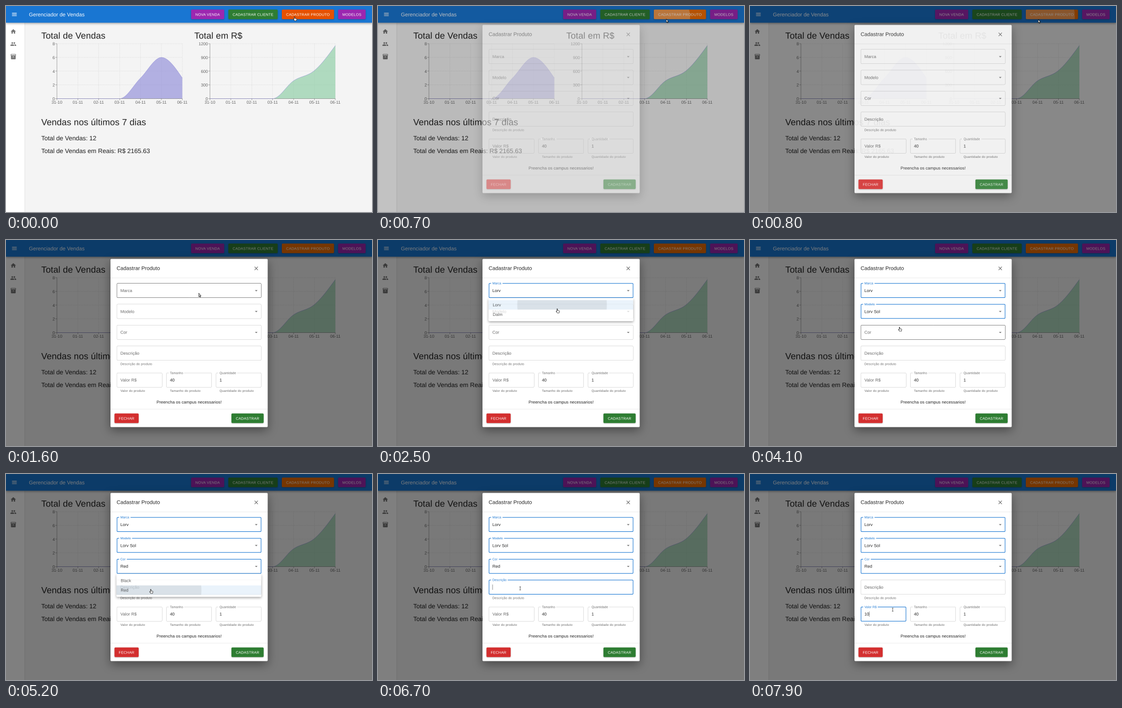
Animation, 690 px wide and 388 px high, one loop 8000 ms. Source, as an HTML page with a canvas:

```html
<!DOCTYPE html>
<html lang="pt-BR">
<head>
<meta charset="utf-8">
<title>Gerenciador de Vendas</title>
<style>
html, body { margin: 0; width: 100%; height: 100%; overflow: hidden; background: #f4f4f4; }
canvas { display: block; width: 690px; height: 388px; }
</style>
</head>
<body>
<canvas id="stage"></canvas>
<script>
const W = 690, H = 388, LOOP = 8000;
const UNIT = W / 1400; // one layout pixel on the stage
const FONT = '"Liberation Sans", Arial, sans-serif';
const BLUE = '#1976d2', GREEN = '#2e7d32', PURPLE = '#9c27b0';
const INK = 'rgba(0,0,0,.87)', SOFT = 'rgba(0,0,0,.6)', ICON = 'rgba(0,0,0,.54)';

// Drawn at double size and scaled down, for smooth small type
const canvas = document.getElementById('stage');
const scale = 2 * (window.devicePixelRatio || 1);
canvas.width = W * scale;
canvas.height = H * scale;
const ctx = canvas.getContext('2d');
ctx.textRendering = 'geometricPrecision';

const clamp = v => Math.max(0, Math.min(1, v));
const ease = v => v * v * (3 - 2 * v);
const ramp = (t, from, dur) => ease(clamp((t - from) / dur));
const within = (t, [a, b]) => t >= a && t < b;

// Size and tracking follow the type scale: px and em; y is the middle of the capitals.
function text(s, x, y, px, color, { em = 0, align = 'left' } = {}) {
  const size = px * UNIT;
  ctx.font = `${size}px ${FONT}`;
  ctx.letterSpacing = `${em * size}px`;
  ctx.textAlign = align;
  ctx.fillStyle = color;
  ctx.fillText(s, x, y + size * 0.36);
  return ctx.measureText(s).width;
}

function line(x1, y1, x2, y2, color, width = 0.5) {
  ctx.strokeStyle = color;
  ctx.lineWidth = width;
  ctx.beginPath();
  ctx.moveTo(x1, y1);
  ctx.lineTo(x2, y2);
  ctx.stroke();
}

function box(x, y, w, h, r) {
  const path = new Path2D();
  path.roundRect(x, y, w, h, r);
  return path;
}

// A raised surface; its shadow falls only outside, so it can fade cleanly.
function surface(path, color, blur, dy, alpha) {
  ctx.fillStyle = color;
  ctx.save();
  const outside = new Path2D(path);
  outside.rect(0, 0, W, H);
  ctx.clip(outside, 'evenodd');
  ctx.shadowColor = `rgba(0,0,0,${alpha})`;
  ctx.shadowBlur = blur * scale;
  ctx.shadowOffsetY = dy * scale;
  ctx.fill(path);
  ctx.restore();
  ctx.fill(path);
}

function icon(path, cx, cy, color) {
  ctx.save();
  ctx.translate(cx, cy);
  ctx.scale(UNIT, UNIT);
  ctx.translate(-12, -12);
  ctx.fillStyle = color;
  ctx.fill(new Path2D(path), 'evenodd');
  ctx.restore();
}

const ICONS = {
  menu: 'M3 6h18v2H3zM3 11h18v2H3zM3 16h18v2H3z',
  home: 'M10 20v-6h4v6h5v-8h3L12 3 2 12h3v8z',
  people: 'M5 8a3 3 0 1 0 6 0a3 3 0 1 0-6 0zM13 8a3 3 0 1 0 6 0a3 3 0 1 0-6 0z' +
    'M1 19v-2.5C1 12 15 12 15 16.5V19zM17 19v-2.5q0-2-2-3.4c3-.4 8 .8 8 3.4V19z',
  archive: 'M4 2h16q2 0 2 2v3q0 1-1 1.7V20q0 2-2 2H5q-2 0-2-2V8.7Q2 8 2 7V4Q2 2 4 2z' +
    'M4 4h16v3H4zM9 12h6v2H9z',
  close: 'M19 6.4L17.6 5 12 10.6 6.4 5 5 6.4 10.6 12 5 17.6 6.4 19 12 13.4 17.6 19 19 17.6 13.4 12z',
  arrow: 'M7 10l5 5 5-5z'
};

function button(label, x, y, w, color) {
  surface(box(x, y, w, 18, 2), color, 2, 0.8, 0.28);
  text(label, x + w / 2, y + 9, 14, '#fff', { em: 0.02857, align: 'center' });
}

// Monotone cubic tangents for evenly spaced values
function tangents(v) {
  const s = v.slice(1).map((b, i) => b - v[i]);
  const m = v.map((_, i) => {
    const a = s[i - 1], b = s[i];
    if (!(a * b > 0)) return 0;
    return 2 * Math.sign(a) * Math.min(Math.abs(a), Math.abs(b), Math.abs(a + b) / 4);
  });
  const n = v.length - 1;
  m[0] = (3 * s[0] - m[1]) / 2;
  m[n] = (3 * s[n - 1] - m[n - 1]) / 2;
  return m;
}

function chart(title, titleX, x0, values, step, fill) {
  const top = 71, bottom = 174.5, w = 236.4, dx = w / 6, dy = (bottom - top) / 4;
  const px = i => x0 + i * dx;
  const py = v => bottom - v / step * dy;
  text(title, titleX, 55.3, 34, INK, { em: 0.00735 });

  ctx.setLineDash([1.5, 1.5]);
  for (let i = 0; i < 7; i++) line(px(i), top, px(i), bottom, '#ccc');
  for (let i = 0; i < 5; i++) line(x0, bottom - i * dy, x0 + w, bottom - i * dy, '#ccc');
  ctx.setLineDash([]);

  const m = tangents(values);
  const curve = new Path2D();
  curve.moveTo(px(0), py(values[0]));
  for (let i = 0; i < 6; i++) {
    curve.bezierCurveTo(px(i + 1 / 3), py(values[i] + m[i] / 3),
      px(i + 2 / 3), py(values[i + 1] - m[i + 1] / 3), px(i + 1), py(values[i + 1]));
  }
  const area = new Path2D(curve);
  area.lineTo(x0 + w, bottom);
  area.lineTo(x0, bottom);
  ctx.globalAlpha = 0.6;
  ctx.fillStyle = fill;
  ctx.fill(area);
  ctx.globalAlpha = 1;

  line(x0, top, x0, bottom, '#666');
  line(x0, bottom, x0 + w, bottom, '#666');
  ctx.strokeStyle = '#8884d8';
  ctx.lineWidth = 0.5;
  ctx.stroke(curve);
  ['31-10', '01-11', '02-11', '03-11', '04-11', '05-11', '06-11'].forEach((day, i) => {
    line(px(i), bottom, px(i), bottom + 3, '#666');
    text(day, px(i), 181.3, 16, '#666', { align: 'center' });
  });
  for (let i = 0; i < 5; i++) {
    const y = bottom - i * dy;
    line(x0 - 3, y, x0, y, '#666');
    text(String(i * step), x0 - 3.9, y + 0.2, 16, '#666', { align: 'right' });
  }
}

function dashboard(t) {
  ctx.fillStyle = '#f4f4f4';
  ctx.fillRect(0, 0, W, H);
  ctx.fillStyle = '#fff';
  ctx.fillRect(0, 0, 35, H);
  line(35.2, 0, 35.2, H, 'rgba(0,0,0,.14)');
  icon(ICONS.home, 13.8, 48, ICON);
  icon(ICONS.people, 13.8, 71.7, ICON);
  icon(ICONS.archive, 13.8, 95.4, ICON);

  surface(box(0, 0, W, 31.5, 0), BLUE, 4, 1.5, 0.35);
  icon(ICONS.menu, 15.8, 15.8, '#fff');
  text('Gerenciador de Vendas', 43.3, 15.8, 20, '#fff', { em: 0.0075 });
  button('NOVA VENDA', 349, 6.8, 62.3, PURPLE);
  button('CADASTRAR CLIENTE', 419.2, 6.8, 93, GREEN);
  button('CADASTRAR PRODUTO', 520, 6.8, 98.4, t < 650 ? '#e65100' : '#ed6c02');
  button('MODELOS', 626.2, 6.8, 51.8, PURPLE);
  if (within(t, [480, 1250])) {
    ctx.save();
    ctx.clip(box(520, 6.8, 98.4, 18, 2));
    ripple(545, 20, 75 * ramp(t, 480, 400), `rgba(255,255,255,${0.3 * (1 - ramp(t, 850, 400))})`);
    ctx.restore();
  }

  chart('Total de Vendas', 66.5, 96, [0, 0, 0, 0, 3, 6, 3], 2, '#8884d8');
  chart('Total em R$', 355, 384.5, [0, 0, 0, 0, 390, 615, 1160], 300, '#82ca9d');
  text('Vendas nos últimos 7 dias', 66.5, 218.6, 34, INK, { em: 0.00735 });
  text('Total de Vendas: 12', 66.5, 248.8, 24, INK);
  text('Total de Vendas em Reais: R$ 2165.63', 66.5, 272.5, 24, INK);
}

function ripple(x, y, r, color) {
  ctx.fillStyle = color;
  ctx.beginPath();
  ctx.arc(x, y, r, 0, 7);
  ctx.fill();
}

const NEVER = [LOOP, LOOP];
const FULL = 272.6, THIRD = 85.7;
const FIELDS = [
  { label: 'Marca', x: 208.8, y: 81.3, w: FULL, hover: [1500, 1850], focus: [1850, LOOP], value: 'Lorv', at: 2400, select: true },
  { label: 'Modelo', x: 208.8, y: 120.6, w: FULL, hover: [2600, 2900], focus: [2900, LOOP], value: 'Lorv Sol', at: 3600, select: true },
  { label: 'Cor', x: 208.8, y: 160, w: FULL, hover: [3950, 4450], focus: [4450, LOOP], value: 'Red', at: 5100, select: true },
  { label: 'Descrição', x: 208.8, y: 199.3, w: FULL, hover: [5380, 5600], focus: [5600, 7150], help: 'Descrição do produto' },
  { label: 'Valor R$', x: 208.8, y: 250, w: THIRD, hover: [7050, 7150], focus: [7150, LOOP], help: 'Valor do produto' },
  { label: 'Tamanho', x: 302.2, y: 250, w: THIRD, value: '40', at: 0, help: 'Tamanho do produto' },
  { label: 'Quantidade', x: 395.7, y: 250, w: THIRD, value: '1', at: 0, help: 'Quantidade do produto' }
];

function field(f, t) {
  const h = 27.7, mid = f.y + h / 2;
  const focus = f.focus || NEVER, focused = within(t, focus);
  const lift = f.at === 0 ? 1 : ramp(t, focus[0], 180) * (1 - ramp(t, focus[1], 180));
  const hovered = within(t, f.hover || NEVER);

  const edge = focused ? 1 : 0.5;
  ctx.strokeStyle = focused ? BLUE : hovered ? INK : 'rgba(0,0,0,.25)';
  ctx.lineWidth = edge;
  ctx.stroke(box(f.x + edge / 2, f.y + edge / 2, f.w - edge, h - edge, 2 - edge / 2));

  const px = 16 - 4 * lift, em = 0.00938;
  if (lift > 0) {
    ctx.font = `${12 * UNIT}px ${FONT}`;
    ctx.letterSpacing = '0px';
    ctx.fillStyle = '#fff';
    ctx.fillRect(f.x + 4.5, f.y - 0.5, (ctx.measureText(f.label).width + 5) * lift, 2);
  }
  text(f.label, f.x + 6.9, mid + (f.y + 0.2 - mid) * lift, px, focused ? BLUE : SOFT, { em });

  if (f.value && t >= f.at) text(f.value, f.x + 6.9, mid, 16, INK, { em });
  if (f.select) icon(ICONS.arrow, f.x + 263, mid + 0.2, ICON);
  if (f.help) text(f.help, f.x + 6.9, f.y + 34, 12, SOFT, { em: 0.03333 });
}

function caret(x, y) {
  line(x, y - 5, x, y + 5, INK, 0.5);
}

function typing(t) {
  if (within(t, [5680, 6180]) || within(t, [6680, 7150])) caret(216, 213.2);
  const typed = t >= 7880 ? '10' : t >= 7780 ? '1' : '';
  const w = typed ? text(typed, 215.7, 263.9, 16, INK, { em: 0.00938 }) : 0;
  if (within(t, [7180, 7680]) || typed) caret(216 + w, 263.9);
}

const MENUS = [
  { y: 109.5, items: ['Lorv', 'Dalm'], pick: 0, x: 347, open: 1880, close: 2400 },
  { y: 148.9, items: ['Lorv Sol'], pick: 0, x: 287, open: 2930, close: 3600 },
  { y: 188.2, items: ['Black', 'Red'], pick: 1, x: 284, open: 4470, close: 5100 }
];

function menu(m, t) {
  if (!within(t, [m.open, m.close + 300])) return;
  const grow = ramp(t, m.open, 230);
  const alpha = grow * (1 - ramp(t, m.close + 10, 270));
  const row = 17.9, pad = 3.7, left = 208.3, w = 273;
  const h = m.items.length * row + 2 * pad;
  ctx.save();
  ctx.globalAlpha = alpha;
  ctx.translate(left + w / 2, m.y);
  ctx.scale(0.75 + 0.25 * grow, 0.56 + 0.44 * grow);
  ctx.translate(-left - w / 2, -m.y);
  surface(box(left, m.y, w, h, 2), '#fff', 5, 2, 0.5);
  m.items.forEach((name, i) => {
    const y = m.y + pad + i * row;
    if (i === m.pick && t > m.open + 250) {
      ctx.save();
      ctx.beginPath();
      ctx.rect(left, y, w, row);
      ctx.clip();
      ctx.fillStyle = 'rgba(25,118,210,.12)';
      ctx.fillRect(left, y, w, row);
      const age = t - m.close;
      if (age > 0) ripple(m.x, y + row / 2, 84 * Math.sqrt(age / 100), 'rgba(0,0,0,.1)');
      ctx.restore();
    }
    text(name, left + 7.9, y + row / 2, 16, INK, { em: 0.00938 });
  });
  ctx.restore();
}

function dialog(t) {
  const show = ramp(t, 540, 330);
  if (!show) return;
  ctx.fillStyle = `rgba(0,0,0,${0.5 * show})`;
  ctx.fillRect(0, 0, W, H);
  ctx.save();
  ctx.globalAlpha = show;
  surface(box(197, 35.8, 296.3, 316.6, 2), '#fff', 18, 6, 0.4);
  text('Cadastrar Produto', 208.6, 53.2, 20, INK, { em: 0.0075 });
  icon(ICONS.close, 471.8, 53.5, SOFT);
  line(197, 71.2, 493.3, 71.2, 'rgba(0,0,0,.14)');
  line(197, 318.8, 493.3, 318.8, 'rgba(0,0,0,.14)');
  FIELDS.forEach(f => field(f, t));
  typing(t);
  text('Preencha os campus necessarios!', 345.2, 305, 16, INK, { em: 0.00938, align: 'center' });
  button('FECHAR', 204.5, 326.8, 45.6, '#d32f2f');
  button('CADASTRAR', 425, 326.8, 60.7, GREEN);
  MENUS.forEach(m => menu(m, t));
  ctx.restore();
}

// Pointer stops: time, x, y
const TRACK = [
  [0, 545, 24], [550, 545, 24], [750, 545, 29], [1250, 545, 29], [1600, 365, 104],
  [1850, 352, 99], [2200, 347, 122], [2400, 347, 122], [2500, 339, 133.5],
  [2800, 292, 138], [2930, 290, 138], [3250, 287, 160], [3620, 287, 160],
  [4100, 283, 168], [4450, 278, 174], [4780, 273, 219], [5100, 273, 219],
  [5200, 274, 221], [5500, 268, 214], [6650, 268, 214], [7120, 269, 255.5]
];

const SHAPES = {
  arrow: 'M-1.6-3.6V2.6L-.2 1.4L.8 3.6L1.7 3.2L.8 1.1H2.6Z',
  hand: 'M-1.8-3.4Q-1.1-4.4-.5-3.4V-.9L2.4-.3Q3.2 0 3.1 .8L2.4 3.8H-1.1L-3.2 .9Q-2.8-.1-1.8 .8Z'
};

function pointer(t) {
  let i = TRACK.findIndex(p => p[0] > t);
  if (i < 0) i = TRACK.length;
  const a = TRACK[i - 1], b = TRACK[i] || a;
  const k = b === a ? 0 : ease((t - a[0]) / (b[0] - a[0]));
  ctx.save();
  ctx.translate(a[1] + (b[1] - a[1]) * k, a[2] + (b[2] - a[2]) * k);
  if (t >= 5400) {
    line(0, -3, 0, 3, '#222', 0.7);
    line(-1.4, -3.1, 1.4, -3.1, '#222', 0.6);
    line(-1.4, 3.1, 1.4, 3.1, '#222', 0.6);
  } else {
    const shape = new Path2D(within(t, [600, 1680]) ? SHAPES.arrow : SHAPES.hand);
    ctx.fillStyle = '#fff';
    ctx.fill(shape);
    ctx.strokeStyle = '#111';
    ctx.lineWidth = 0.7;
    ctx.stroke(shape);
  }
  ctx.restore();
}

function frame() {
  const t = performance.now() % LOOP;
  ctx.setTransform(scale, 0, 0, scale, 0, 0);
  dashboard(t);
  dialog(t);
  pointer(t);
  requestAnimationFrame(frame);
}
frame();
</script>
</body>
</html>
```
